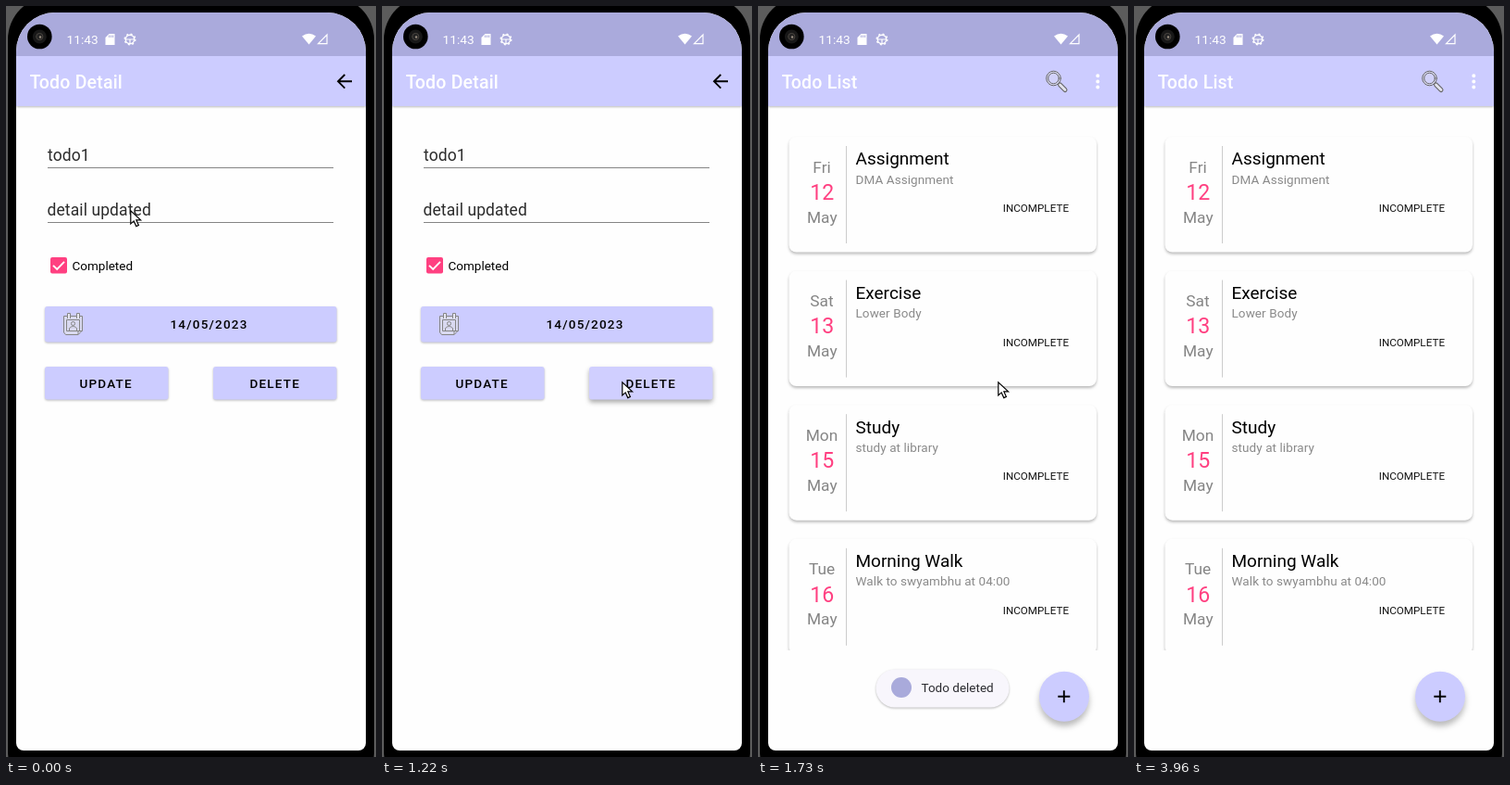
Animation of 400 by 810 pixels, one loop 4490 ms. Source, as an HTML page:

```html
<!DOCTYPE html>
<html lang="en">
<head>
<meta charset="utf-8">
<title>Todo app</title>
<style>
  html, body { margin: 0; width: 100%; height: 100%; overflow: hidden; background: #000; }
  svg { display: block; width: 400px; height: 810px; font: 13.5px Roboto, sans-serif; }
  .title { font-size: 19.5px; font-weight: 500; letter-spacing: .2px; fill: #fff; }
  .field { font-size: 17.5px; letter-spacing: .1px; fill: #2c2c2c; }
  .button { font-weight: 500; letter-spacing: 1.2px; }
  .day { font-size: 17.3px; fill: #858585; text-anchor: middle; }
  .date { font-size: 23.1px; fill: #ff4081; text-anchor: middle; }
  .name { font-size: 19px; }
  .note { letter-spacing: .08px; fill: #8a8a8a; }
  .state { font-size: 11.6px; letter-spacing: .05px; fill: #111; }
  .low { filter: drop-shadow(0 1.5px 1px #0004); }
  .card { filter: drop-shadow(0 2.5px 1.5px #0004); }
  .high { filter: drop-shadow(0 3px 2.5px #0005); }
  .float { filter: drop-shadow(0 5px 3px #0004); }
  .line { fill: none; stroke: #858585; }
</style>
</head>
<body>
<svg viewBox="0 0 400 810">
  <defs>
    <clipPath id="screen"><path d="M11 49A42 42 0 0 1 53 7H347A42 42 0 0 1 389 49V795A8 8 0 0 1 381 803H19A8 8 0 0 1 11 795Z"/></clipPath>
    <clipPath id="listArea"><path d="M11 109H389V695H11Z"/></clipPath>
    <radialGradient id="ripple"><stop offset=".6" stop-color="#dbd9fe"/><stop offset="1" stop-color="#d6d5fd"/></radialGradient>
  </defs>
  <path d="M0 0H400V810H0Z" fill="#5c5c5c"/>
  <rect x="2" y="-10" width="396" height="860" rx="46"/>
  <g clip-path="url(#screen)">
    <path d="M11 7H389V803H11Z" fill="#fefefe"/>
    <path class="low" d="M11 54H389V108H11Z" fill="#ccf"/>
    <path d="M11 7H389V54H11Z" fill="#aaaadc"/>
    <g fill="#fff">
      <text x="65.5" y="41" font-size="13.7">11:43</text>
      <path d="M111.5 30H117.5V42H107.5V34Z"/>
      <path d="M320 32.5Q327.5 27 335 32.5L327.5 41.5Z"/>
      <path d="M337.5 40.7H347V31Z" fill="none" stroke="#fff" stroke-width="1.2"/>
      <g fill="none" stroke="#fff">
        <circle cx="134" cy="36" r="4.7" stroke-width="1.5"/>
        <circle cx="134" cy="36" r="5.8" stroke-width="1.4" stroke-dasharray="2 2.55"/>
        <path d="M130 36H138M134 36V40" stroke-width="1.2"/>
      </g>
    </g>
    <path d="M111.6 31.5V34M113.6 31.5V34M115.6 31.5V34" stroke="#aaaadc"/>

    <g id="detail">
      <text class="title" x="25.7" y="89">Todo Detail</text>
      <path d="M374 81.3H359.5M366.3 74L359 81.3L366.3 88.6" fill="none" stroke="#000" stroke-width="1.9"/>
      <text class="field" x="45" y="167">todo1</text>
      <text class="field" x="44.5" y="226">detail updated</text>
      <path d="M45 174.5H354M45 233.5H354" stroke="#858585"/>
      <rect x="48" y="271" width="18" height="17.5" rx="2" fill="#ff4081"/>
      <path d="M51 279.8L55.2 284L63 275.8" fill="none" stroke="#fff" stroke-width="1.9"/>
      <text x="71.5" y="285">Completed</text>
      <g fill="#ccf">
        <rect class="low" x="42" y="324" width="315.5" height="38.5" rx="3"/>
        <rect class="low" x="42" y="389" width="133.5" height="35.5" rx="3"/>
        <rect id="delete" x="224" y="389" width="133.5" height="35.5" rx="3"/>
      </g>
      <g class="line">
        <path d="M62.5 334.5H82.5V350L78 354.5H64.5L62.5 352Z" fill="#d9d9f0"/>
        <path d="M65.5 338.5H79.5V350.5H65.5ZM78 354.5V350.5H82.5"/>
        <path d="M66.5 337V331.5H69.5V337M76.5 337V331.5H79.5V337" fill="#e8e8f4"/>
        <circle cx="72.5" cy="342.5" r="2"/>
        <path d="M68.5 350V347.5Q72.5 343.5 76.5 347.5V350"/>
      </g>
      <g class="button">
        <text x="177.5" y="348">14/05/2023</text>
        <text x="79.5" y="411.5">UPDATE</text>
        <text x="263.5" y="411.5">DELETE</text>
      </g>
    </g>

    <g id="list">
      <text class="title" x="25.7" y="89">Todo List</text>
      <g stroke="#666" stroke-linecap="round">
        <path d="M326.5 85L332 90.5" stroke-width="5"/>
        <path d="M326.5 85L332 90.5" stroke="#e4e4ee" stroke-width="2.8"/>
        <circle cx="319.5" cy="78" r="7.8" fill="#dcdcf6"/>
        <circle cx="319.5" cy="78" r="5.8" fill="#d2d2fa"/>
      </g>
      <path d="M367.3 75.3v0m0 6.1v0m0 6.1v0" stroke="#fff" stroke-width="4" stroke-linecap="round"/>
      <g id="cards" clip-path="url(#listArea)"></g>
      <circle class="float" cx="331" cy="744.7" r="27" fill="#ccf"/>
      <path d="M324.3 744.7H337.3M330.8 738.2V751.2" stroke="#000" stroke-width="1.9"/>
    </g>

    <g id="toast">
      <rect id="pill" class="low" x="127.5" y="715.5" width="144" height="41" rx="20.5"/>
      <g id="message">
        <circle cx="155" cy="735" r="11" fill="#a9aadb"/>
        <text x="176.5" y="740" fill="#2b2b30">Todo deleted</text>
      </g>
    </g>
  </g>
  <circle cx="36.3" cy="33" r="13.3"/>
  <circle cx="36.3" cy="33" r="7.5" fill="#181818"/>
  <circle cx="36.3" cy="33" r="3.6" fill="#222" stroke="#4a4540"/>
  <circle cx="37" cy="33.5" r="1.2" fill="#998e80"/>
  <path id="cursor" d="M.8 .8V15L4.2 11.9L6.8 17.6L9.4 16.4L6.9 10.9H11.6Z" fill="#fff" stroke="#000" stroke-width="1.2"/>
</svg>
<script>
const LOOP = 4490;
const $ = id => document.getElementById(id);

const tasks = [
  ['Fri', 12, 'Assignment', 'DMA Assignment'],
  ['Sat', 13, 'Exercise', 'Lower Body'],
  ['Mon', 15, 'Study', 'study at library'],
  ['Tue', 16, 'Morning Walk', 'Walk to swyambhu at 04:00'],
];
$('cards').innerHTML = tasks.map(([day, date, name, note], i) => `
  <g transform="translate(0 ${i * 144.6})">
    <rect class="card" x="33.5" y="141" width="332.5" height="124.5" rx="8" fill="#fefefe"/>
    <path d="M95.5 151V256" stroke="#ccc"/>
    <text class="day" x="69" y="179.6">${day}</text>
    <text class="date" x="69.3" y="208.8">${date}</text>
    <text class="day" x="69.3" y="233.7">May</text>
    <text class="name" x="105.5" y="171.4">${name}</text>
    <text class="note" x="105.5" y="191.5">${note}</text>
    <text class="state" x="264.7" y="222.3">INCOMPLETE</text>
  </g>`).join('');

// Each row: start time, then the values held until the next row.
const cursorTrack = [
  [0, 134, 220], [270, 160, 262], [400, 207, 342], [520, 231, 380],
  [660, 247, 394], [790, 259, 405], [3570, 259, 423],
  [3720, 276, 510], [3840, 311, 690], [3960, -50, 0],
];
// scale, pill colour, message opacity, whole opacity
const toastTrack = [
  [0, 1, '#fff', 0, 0], [1370, .94, '#ededef', 0, 1], [1490, .98, '#fdfdfe', .45, 1],
  [1610, .995, '#f9f7fc', .85, 1], [1730, 1, '#f8f6fc', 1, 1],
  [3720, 1, '#f8f6fc', 1, .75], [3840, .98, '#f8f6fc', 1, .3], [3960, 1, '#fff', 0, 0],
];
const at = (track, t) => track.findLast(row => row[0] <= t).slice(1);

function draw(t) {
  const showList = t >= 1490, pressed = t >= 1220;
  $('detail').style.display = showList ? 'none' : '';
  $('list').style.display = showList ? '' : 'none';
  $('delete').setAttribute('class', pressed ? 'high' : 'low');
  $('delete').setAttribute('fill', t >= 1370 ? 'url(#ripple)' : pressed ? '#d0cfff' : '#ccf');

  const [x, y] = at(cursorTrack, t);
  $('cursor').setAttribute('transform', `translate(${x} ${y})`);

  const [scale, colour, message, opacity] = at(toastTrack, t);
  $('toast').setAttribute('transform', `translate(199.5 737) scale(${scale}) translate(-199.5 -737)`);
  $('toast').style.opacity = opacity;
  $('pill').setAttribute('fill', colour);
  $('message').style.opacity = message;
}

const start = performance.now();
(function tick() {
  draw((performance.now() - start) % LOOP);
  requestAnimationFrame(tick);
})();
</script>
</body>
</html>
```
